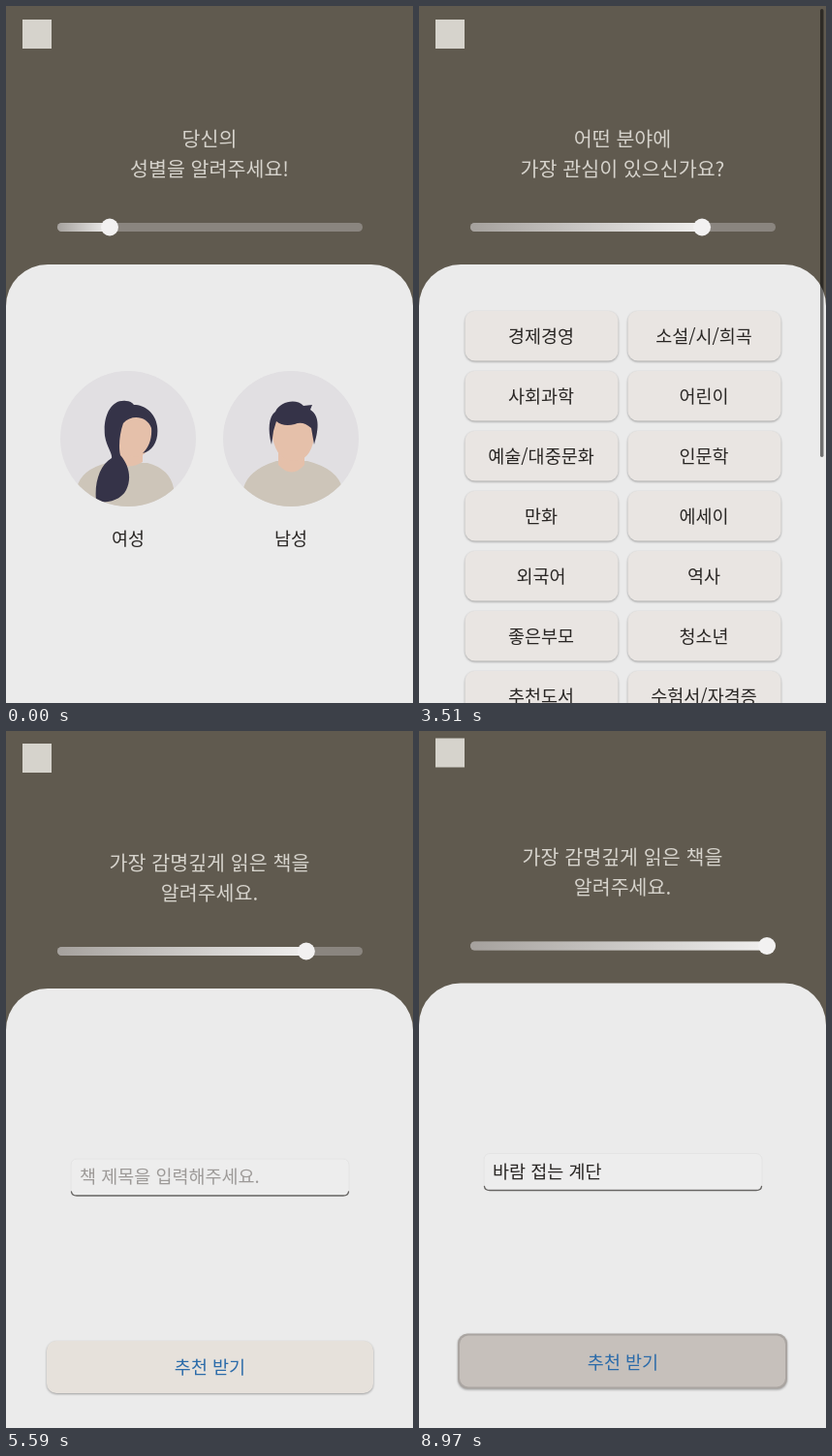
These frames come from a looping animation (420x720 px, 9.1 s). An HTML page:

```html
<!DOCTYPE html>
<html lang="ko">
<head>
<meta charset="utf-8">
<style>
html, body { margin: 0; width: 100%; height: 100%; overflow: hidden; background: #605a4f; }
svg { display: block; width: 100%; height: 100%; }
text { font-family: "Noto Sans CJK KR", "Noto Sans CJK", "Noto Sans", sans-serif; text-anchor: middle; fill: #292624; white-space: pre; }
.head text { font-size: 20.6px; font-weight: 300; fill: #d6d3cc; }
.label { font-size: 18.5px; font-weight: 500; }
.small { font-size: 15.8px; font-weight: 500; }
.item { font-size: 18.5px; }
.keys text { font-family: Inter, Roboto, sans-serif; fill: #f4f2f2; }
.raised { filter: drop-shadow(0 1.5px 1px #0005); }
.hair { fill: #353348; }
.skin { fill: #e5c0aa; }
.cloth { fill: #cdc5b9; }
.gold { fill: #e7c517; }
.line { fill: none; stroke-linecap: round; stroke-linejoin: round; }
</style>
</head>
<body>
<svg viewBox="0 0 420 720" preserveAspectRatio="none">
  <defs>
    <linearGradient id="fade"><stop stop-color="#a5a19d"/><stop offset="1" stop-color="#f0efee"/></linearGradient>
    <clipPath id="clipWoman"><circle cx="126" cy="447" r="70"/></clipPath>
    <clipPath id="clipMan"><circle cx="294" cy="447" r="70"/></clipPath>
    <clipPath id="clipRest"><circle cx="126" cy="258" r="54"/></clipPath>
  </defs>
  <rect width="420" height="720" fill="#605a4f"/>
  <g id="world">
    <rect x="17" y="14" width="30" height="30" fill="#d6d3cc"/>
    <g class="head"><text id="line1" x="210"/><text id="line2" x="210"/></g>
    <rect x="53" y="224" width="315" height="9" rx="4.5" fill="#8a857f"/>
    <rect id="fill" x="53" y="224" height="9" rx="4.5" fill="url(#fade)"/>
    <circle id="thumb" cy="228.5" r="9" fill="#f2f1f1"/>
    <path d="M0 1400V310A43 43 0 0 1 43 267H377A43 43 0 0 1 420 310V1400Z" fill="#ebebeb"/>

    <g class="page">
      <g fill="#e1dfe2"><circle cx="126" cy="447" r="70"/><circle cx="294" cy="447" r="70"/></g>
      <g clip-path="url(#clipWoman)">
        <path class="cloth" d="M73 498Q77 479 104 472H146Q169 478 173 498V520H73Z"/>
        <path class="skin" d="M111 446V471Q126 480 141 471V450Z"/>
        <ellipse class="skin" cx="134" cy="443" rx="17" ry="23"/>
        <path class="hair" d="M124 408C108 406 100 424 102 444C104 456 110 462 109 467C97 474 91 492 93 511C104 515 119 510 124 500C130 488 127 474 118 464C116 456 117 442 121 431C130 421 146 424 150 436C151 447 147 457 141 462C152 460 158 448 156 434C154 420 143 412 132 412Q129 408 124 408Z"/>
      </g>
      <g clip-path="url(#clipMan)">
        <path class="cloth" d="M245 498Q250 479 279 470H311Q342 478 347 498V520H245Z"/>
        <path class="skin" d="M281 455V474Q295 489 308 474V455Z"/>
        <path class="skin" d="M275 428H318V446Q314 470 297 470T275 446Z"/>
        <path class="hair" d="M274 453C270 438 271 424 278 419C283 408 300 405 307 413L316 412L314 417C325 424 322 440 318 453L315 436Q306 428 298 432Q286 435 279 429L276 439Z"/>
      </g>
      <g id="sexes"></g>
    </g>

    <g class="page">
      <g transform="translate(0 122)">
        <g id="dots" fill="#e1dfe2"></g>
        <g clip-path="url(#clipRest)">
          <path class="hair" d="M112 268C111 246 115 234 126 234C138 234 142 246 141 268Z"/>
          <path class="cloth" d="M100 315Q104 278 114 269L139 266Q150 272 161 303L150 315Z"/>
          <path class="skin" d="M120 256H133V269Q126 275 120 269Z"/>
          <ellipse class="skin" cx="126" cy="251" rx="8" ry="12"/>
          <path class="line" d="M126 290L133 273M116 290L112 312M137 290L143 310" stroke="#beb6ab"/>
          <path class="skin" d="M121 264L131 262L137 269L129 280L121 275Z"/>
          <rect class="gold" x="111" y="261" width="13" height="15" rx="2"/>
        </g>
        <g>
          <path class="cloth" d="M271 271Q284 261 292 276L307 284L303 292L284 285L281 292H271Z"/>
          <path class="skin" d="M303 284L316 287V291L305 291ZM312 258L317 252L320 260L315 266Z"/>
          <path class="cloth" d="M285 268L312 259L315 266L292 279Z"/>
          <ellipse class="skin" cx="282" cy="250" rx="5.5" ry="9"/>
          <path class="hair" d="M269 238C279 233 288 237 286 243C278 245 282 257 277 263C276 271 268 276 263 273C262 268 266 260 264 250Q264 241 269 238Z"/>
          <path class="line" d="M302 265Q301 257 297 251A17 17 0 1 1 323 251Q318 257 318 265" stroke="#a3a1a4" stroke-width=".9"/>
          <path class="line" d="M304 233Q316 229 315 234L305 239Q317 235 316 241L306 246Q316 243 313 251" stroke="#e7c517" stroke-width="1.9"/>
          <path class="hair" d="M301 265H320V273L316 276V283Q310 289 305 283V276L301 273Z"/>
        </g>
        <g>
          <path class="skin" d="M104 437H110V470Q107 476 103 471ZM121 402H131V417H121Z"/>
          <path class="hair" d="M114 456H141V474H130L127 462L125 474H113Z"/>
          <path class="cloth" d="M107 422Q109 415 121 412L133 413Q142 414 144 420L141 433V458H111V440H104Z"/>
          <path class="line" d="M145 421L133 409" stroke="#e5c0aa" stroke-width="6"/>
          <path class="cloth" d="M138 417L144 412L150 422L141 432Z"/>
          <ellipse class="skin" cx="125" cy="401" rx="6.5" ry="9"/>
          <path class="hair" d="M117 401C114 394 118 389 124 391C131 387 135 393 132 402L129 396L120 397Z"/>
        </g>
        <g>
          <path class="hair" d="M286 409C285 396 288 390 296 390C304 390 307 398 306 409Z"/>
          <path class="cloth" d="M281 424Q282 415 290 412H302Q310 415 311 425L309 452H282Z"/>
          <ellipse class="skin" cx="296" cy="404" rx="7" ry="8"/>
          <path class="hair" d="M288 402Q289 393 296 393T304 402Q297 399 288 402Z"/>
          <path class="gold" d="M288 411L296 413L303 411L302 430L296 432L290 430Z"/>
          <path class="hair" d="M283 448L295 452L278 463L298 468L290 478L284 475L268 468Q265 464 270 459ZM309 448L297 452L314 463L294 469L303 478L309 474L325 468Q328 464 322 459Z"/>
        </g>
        <g>
          <path class="line" d="M159 614H103Q94 614 94 623.5T103 633H159" stroke="#e7c517" stroke-width="1.5"/>
          <path class="line" d="M159 617H104Q98 617 98 623.5T104 630H159" stroke="#e7c517" stroke-width=".6"/>
          <path class="line" d="M122 569L108 573M134 567L137 572L133 578" stroke="#cdc5b9" stroke-width="3"/>
          <path class="cloth" d="M122 565L133 564L134 578H123Z"/>
          <path class="line" d="M126 580L117 609M130 580L134 609" stroke="#353348" stroke-width="5.5"/>
          <circle class="skin" cx="128" cy="559" r="4.5"/>
          <path class="hair" d="M123 558C122 551 130 549 132 554L131 558L126 555Z"/>
          <path class="hair" d="M130 552C134 546 141 549 140 556C142 561 140 565 137 567C138 561 133 560 130 552Z"/>
        </g>
        <g>
          <path class="hair" d="M292 577C291 562 295 551 304 551C314 551 316 562 314 577Z"/>
          <path class="cloth" d="M291 578L311 576Q322 577 328 583L338 597L320 605L317 612L292 600Z"/>
          <ellipse class="skin" cx="304" cy="563" rx="6.5" ry="10"/>
          <path class="skin" d="M299 569H309V578Q304 583 299 578Z"/>
          <path class="line" d="M321 587L327 595L316 600" stroke="#b9b1a6" stroke-width=".8"/>
          <path class="gold" d="M284 588C274 571 251 575 251 599C251 611 262 620 285 641C308 620 316 610 316 598C316 575 293 571 284 588Z"/>
          <path class="skin" d="M252 604L261 606L262 612L254 614ZM309 600L319 598V604L311 605Z"/>
        </g>
        <g id="reasons"></g>
      </g>
    </g>

    <g class="page" id="topics"></g>

    <g class="page">
      <rect x="67" y="443" width="287" height="38" rx="6" fill="#ededed" stroke="#e4e4e4"/>
      <path class="line" d="M67.5 477Q68 481 73 481H348Q353 481 353.5 477" stroke="#676563" stroke-width="1.4"/>
      <rect id="focus" x="65.5" y="442.5" width="290" height="39" rx="6" fill="none" stroke="#79a8d3" stroke-width="3"/>
      <text id="entry" class="item" x="76" y="468" style="text-anchor:start"/>
      <rect id="caret" y="447" width="3" height="27" rx="1" fill="#4c83ba"/>
      <g id="send"></g>
    </g>
  </g>
  <rect id="bar" x="414" width="3.5" rx="1.7" fill="#000" opacity=".52"/>
  <g id="board" class="keys"></g>
</svg>
<script>
const STEP = 130, LOOP = 9100;
const $ = id => document.getElementById(id);
const set = (id, attrs) => { for (const k in attrs) $(id).setAttribute(k, attrs[k]); };
const show = (el, on) => { el.style.display = on ? '' : 'none'; };
const label = (x, y, s, cls) => `<text class="${cls}" x="${x}" y="${y + (cls === 'small' ? 6 : 7)}">${s}</text>`;
const box = (x, y, w, h, r, fill, cls = '') =>
  `<rect class="${cls}" x="${x}" y="${y}" width="${w}" height="${h}" rx="${r}" fill="${fill}"/>`;
const raised = (x, y, w, h, fill) => box(x, y, w, h, 10, fill, 'raised');
const grid = (names, fn) => names.map((s, i) => fn(126 + i % 2 * 168, i >> 1, s)).join('');

$('sexes').innerHTML = grid(['여성', '남성'], (x, r, s) => label(x, 550, s, 'label'));
const reasons = ['힐링', '자기계발', '재미', '베스트 셀러', '스펙', '자존감'];
$('dots').innerHTML = grid(reasons, (x, r) => `<circle cx="${x}" cy="${258 + r * 167}" r="54"/>`);
$('reasons').innerHTML = grid(reasons, (x, r, s) => label(x, 342 + r * 166.5, s, 'small'));
const topics = ('경제경영 소설/시/희곡 사회과학 어린이 예술/대중문화 인문학 만화 에세이 외국어 역사 좋은부모 청소년 ' +
  '추천도서 수험서/자격증 컴퓨터/모바일 과학 건강/취미 고전 유아 요리/살림 여행 종교/역학 잡지 달력/기타 ' +
  '과학/수학/생태 기술공학').split(' ');
$('topics').innerHTML = grid(topics, (x, r, s) =>
  raised(x - 78.5, 315 + r * 62, 158, 51.5, '#e9e5e2') + label(x, 341 + r * 62, s, 'item'));

function buildKeys() {
  const key = (x, y, w, s, size = 23, fill = '#8b8888') =>
    box(x, y + 1.5, w, 46, 5, '#555354') + box(x, y, w, 46, 5, fill) +
    `<text x="${x + w / 2}" y="${y + 23 + size * .36}" font-size="${size}">${s}</text>`;
  const dark = '#666364';
  const row = (y, chars) => [...chars].map((c, i) => key(3 + i * 42, y, 36, c === '&' ? '&amp;' : c)).join('');
  return box(0, 451, 420, 269, 0, '#716e6f') + box(0, 451, 420, 47, 0, '#5c5a5a') +
    '<path class="line" d="M21 480L30 470L39 480M64 470L73 480L82 470" stroke="#aaa7a7" stroke-width="1.5"/>' +
    '<text x="388" y="481" font-size="15.5" font-weight="600" style="font-family:\'Noto Sans CJK KR\',\'Noto Sans CJK\',sans-serif">완료</text>' +
    row(507, '1234567890') + row(565, '-/:;()$&@”') +
    key(3, 624, 48, '#+=', 14, dark) +
    [...'.,?!’'].map((c, i) => key(66 + i * 59, 624, 52, c)).join('') +
    key(370, 624, 47, '', 20, dark) +
    '<path class="line" d="M382 647L390 638H404V656H390ZM392 642L400 652M400 642L392 652" stroke="#f4f2f2" stroke-width="1.8"/>' +
    key(3, 682, 46, 'ABC', 16, dark) + key(56, 682, 46, '', 20, dark) +
    '<circle cx="79" cy="705" r="11" fill="#f4f2f2"/><circle cx="75" cy="702" r="1.6"/><circle cx="83" cy="702" r="1.6"/><path d="M72 706H86Q84 713 79 713T72 706Z"/>' +
    key(108, 682, 204, 'space', 17) + key(319, 682, 98, 'return', 17, dark);
}
$('board').innerHTML = buildKeys();

const pages = document.querySelectorAll('.page');
const starts = [0, 1170, 3120, 5330];
const titles = [
  ['당신의', '성별을 알려주세요!'],
  ['당신이 책을 읽는 이유는', '무엇인가요?'],
  ['어떤 분야에', '가장 관심이 있으신가요?'],
  ['가장 감명깊게 읽은 책을', '알려주세요.']
];
const answer = '바람 접는 계단';

const span = (t, from, len) => Math.min(1, Math.max(0, (t - from) / len));
const ease = (t, from, len) => {
  const u = span(t, from, len);
  return u < .5 ? 4 * u ** 3 : 1 - 4 * (1 - u) ** 3;
};
const glide = (t, from, len) => 1 - (1 - span(t, from, len)) ** 3;

function scrollAt(t, page) {
  if (page === 1) return 122 * ease(t, 1500, 650);
  if (page === 2) return 398 * glide(t, 3510, 1130);
  if (page === 3) return 1 + 42 * ease(t, 5850, 350) - 31 * ease(t, 7950, 350) - 5.5 * span(t, 8300, 600);
  return 0;
}

function drawBar(t, page, scroll) {
  const on = page === 1 ? t >= 1500 && t < 2700 : page === 2 && t >= 3500 && t < 4900;
  show($('bar'), on);
  if (on) set('bar', page === 1
    ? { y: 3 + scroll * .69, height: 628 }
    : { y: 3 + scroll * .51, height: 463 });
}

function drawEntry(t) {
  const typed = answer.slice(0, Math.floor(span(t, 6900, 800) * answer.length));
  const focused = t >= 5850 && t < 7950;
  const entry = $('entry');
  entry.textContent = typed || '책 제목을 입력해주세요.';
  entry.style.fill = typed ? '#292624' : '#9d9a98';
  show($('focus'), focused);
  show($('caret'), focused);
  set('caret', { x: typed ? 78 + entry.getComputedTextLength() : 76 });
  const pressed = t >= 8800;
  $('send').innerHTML = (pressed ? raised(40, 629, 340, 57, '#aaa5a1') + box(42, 631, 336, 53, 9, '#c6c0bb')
    : raised(42, 631, 337, 54, '#e6e1db')) +
    '<text class="item" x="210.5" y="665" style="fill:#2b6ba9">추천 받기</text>';
}

function draw(t) {
  const page = starts.filter(s => t >= s).length - 1;
  pages.forEach((p, i) => show(p, i === page));
  titles[page].forEach((s, i) => {
    $('line' + (i + 1)).textContent = s;
    set('line' + (i + 1), { y: 144.5 + i * 31 });
  });
  const scroll = scrollAt(t, page);
  set('world', { transform: `translate(0 ${-scroll})` });
  const x = 107 + 63 * [1170, 2650, 3135, 5400].reduce((sum, s) => sum + ease(t, s, 500), 0);
  set('thumb', { cx: x });
  set('fill', { width: x - 53 });
  drawBar(t, page, scroll);
  if (page === 3) drawEntry(t);
  const up = ease(t, 5850, 350) - ease(t, 7950, 350);
  show($('board'), up > 0);
  set('board', { transform: `translate(0 ${270 * (1 - up)})` });
}

const begin = performance.now();
function tick() {
  const t = (performance.now() - begin) % LOOP;
  draw(Math.floor(t / STEP) * STEP);
  requestAnimationFrame(tick);
}
tick();
</script>
</body>
</html>
```
